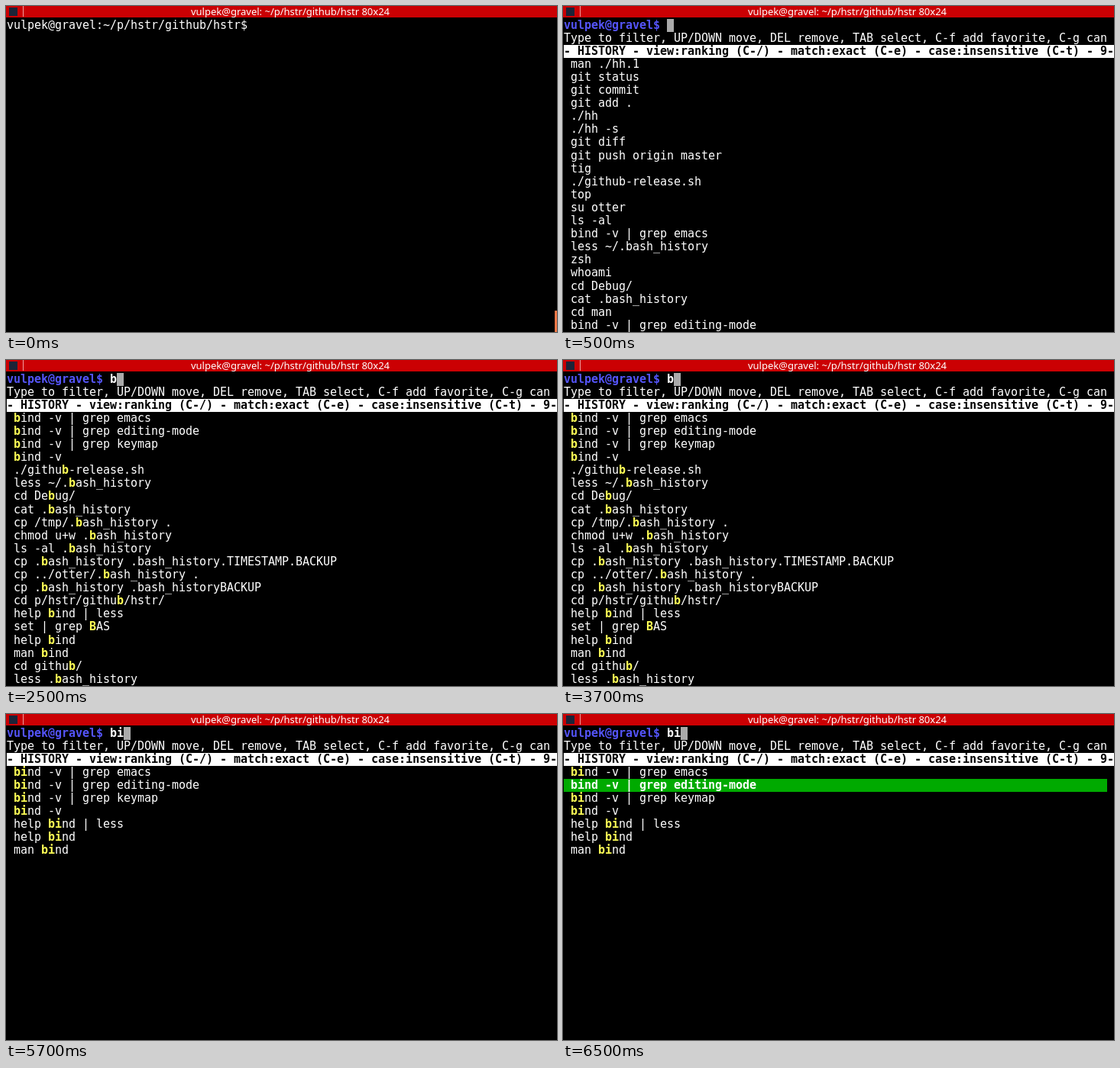
These frames come from a looping animation (721x427 px, 8000 ms). An HTML page:

```html
<!DOCTYPE html>
<html lang="en">
<head>
<meta charset="utf-8">
<title>Shell history search</title>
<style>
html, body { margin: 0; width: 100%; height: 100%; overflow: hidden; background: #000; }
svg { display: block; width: 721px; height: 427px; }
text { white-space: pre; }
.bar { font: 13px "Noto Sans", "Open Sans", sans-serif; fill: #fff; text-anchor: middle; }
#screen { font: 15px "DejaVu Sans Mono", monospace; }
.bold { font-weight: bold; }
</style>
</head>
<body>
<svg viewBox="0 0 721 427" xmlns="http://www.w3.org/2000/svg">
  <rect width="721" height="427"/>
  <g id="screen"></g>
  <rect width="721" height="15" fill="#cb0003"/>
  <rect x="4" y="2" width="11" height="11" fill="#1c2438"/>
  <rect x="22" y="0" width="1" height="14" fill="#f0a0a0"/>
  <text class="bar" x="372" y="12">vulpek@gravel: ~/p/hstr/github/hstr 80x24</text>
</svg>
<script>
const LOOP = 8000;
const CELL = 9, LINE = 17.1, LEFT = 1, TOP = 16.5;
const WHITE = '#fff', BLUE = '#5454f8', YELLOW = '#ffff55', GREEN = '#00aa00', GREY = '#aaa';

const USER = 'vulpek@gravel';
const HINT = 'Type to filter, UP/DOWN move, DEL remove, TAB select, C-f add favorite, C-g can';
const STATUS = '- HISTORY - view:ranking (C-/) - match:exact (C-e) - case:insensitive (C-t) - 9-';

const ranked = `man ./hh.1
git status
git commit
git add .
./hh
./hh -s
git diff
git push origin master
tig
./github-release.sh
top
su otter
ls -al
bind -v | grep emacs
less ~/.bash_history
zsh
whoami
cd Debug/
cat .bash_history
cd man
bind -v | grep editing-mode`.split('\n');

const matches = `bind -v | grep emacs
bind -v | grep editing-mode
bind -v | grep keymap
bind -v
./github-release.sh
less ~/.bash_history
cd Debug/
cat .bash_history
cp /tmp/.bash_history .
chmod u+w .bash_history
ls -al .bash_history
cp .bash_history .bash_history.TIMESTAMP.BACKUP
cp ../otter/.bash_history .
cp .bash_history .bash_historyBACKUP
cd p/hstr/github/hstr/
help bind | less
set | grep BAS
help bind
man bind
cd github/
less .bash_history`.split('\n');

const screen = document.getElementById('screen');
const colX = col => LEFT + col * CELL;
const rowY = row => Math.round(TOP + row * LINE);

function add(tag, attrs, content = '') {
  const el = document.createElementNS('http://www.w3.org/2000/svg', tag);
  for (const key in attrs) el.setAttribute(key, attrs[key]);
  el.textContent = content;
  screen.append(el);
}

// Each character sits on the terminal's column grid.
function write(row, col, str, fill = WHITE, bold = false) {
  if (!str) return;
  const x = [...str].map((_, i) => colX(col + i)).join(' ');
  add('text', { x, y: rowY(row) + 13, fill, class: bold ? 'bold' : '' }, str);
}

function block(row, col, cells, fill) {
  add('rect', { x: colX(col), y: rowY(row), width: cells * CELL, height: 17, fill });
}

function writeMatch(row, line, query) {
  const at = line.toLowerCase().indexOf(query);
  const end = at + query.length;
  write(row, 1, line.slice(0, at));
  write(row, 1 + at, line.slice(at, end), YELLOW, true);
  write(row, 1 + end, line.slice(end));
}

function drawShell() {
  write(0, 0, USER + ':~/p/hstr/github/hstr$');
  add('rect', { x: 718, y: 399, width: 3, height: 28, fill: '#f07746' });
}

function drawSearch(query, selected) {
  const prompt = USER + '$';
  const start = prompt.length + 1;
  write(0, 0, prompt, BLUE, true);
  write(0, start, query, WHITE, true);
  block(0, start + query.length, 1, GREY);
  write(1, 0, HINT);
  block(2, 0, 80, WHITE);
  write(2, 0, STATUS, '#000', true);

  const lines = query ? matches.filter(s => s.toLowerCase().includes(query)) : ranked;
  lines.forEach((line, i) => {
    const row = i + 3;
    if (i === selected) {
      block(row, 0, 79, GREEN);
      write(row, 1, line, WHITE, true);
    } else {
      writeMatch(row, line, query);
    }
  });
}

const steps = [
  [0, drawShell],
  [500, () => drawSearch('', -1)],
  [2500, () => drawSearch('b', -1)],
  [4500, () => drawSearch('bi', -1)],
  [6500, () => drawSearch('bi', 1)]
];

let shown = null;
function render(time) {
  const step = steps.findLast(([from]) => from <= time % LOOP);
  if (step === shown) return;
  shown = step;
  screen.replaceChildren();
  step[1]();
}

const began = performance.now();
function tick() {
  render(performance.now() - began);
  requestAnimationFrame(tick);
}
tick();
</script>
</body>
</html>
```
